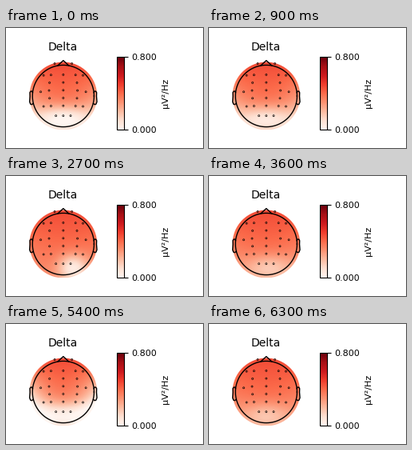
Animation of 247x150 px, one loop 7200 ms. Source, as a matplotlib script:

```python
import numpy as np
import matplotlib.pyplot as plt
from matplotlib.animation import FuncAnimation
from matplotlib.patches import Circle

W, H, DPI = 247, 150, 100
CX, CY, R = 71.8, 85, 38.6
CLIP = 1.1
VMAX = 0.8

plt.rcParams["font.family"] = "DejaVu Sans"

# Dip at the back of the head: depth, sideways shift, width; fade of the sides
STEPS = [
    (0.34, 0.00, 0.9, 0.08),
    (0.27, 0.00, 0.9, 0.08),
    (0.26, 0.00, 1.2, 0.18),
    (0.29, 0.33, 0.5, 0.02),
    (0.18, 0.10, 0.8, 0.03),
    (0.12, 0.15, 0.8, 0.02),
    (0.27, 0.05, 1.2, 0.18),
    (0.17, 0.00, 0.8, 0.03),
]

# Head coordinates: u to the right, v to the front, head radius 1
axis = np.linspace(-CLIP, CLIP, 64)
U, V = np.meshgrid(axis, axis)


def field(step):
    depth, shift, width, fade = STEPS[step]
    front = 0.40 + 0.06 * V
    sides = fade * (U ** 2 + 0.2) * (1.05 - V)
    dip = depth * np.exp(-((U - shift) / width) ** 2 - ((V + 0.8) / 0.45) ** 2)
    return front - sides - dip


def sensors():
    """Five midline rows with side pairs, plus the front and back rows."""
    spots = [(-10.8, 44.5), (10.8, 44.5)]
    spots += [(x, 109.7) for x in (-9.2, 0, 9.2)]
    for row in range(5):
        bend = (row - 2) ** 2
        y = 58.4 + 9.7 * row
        inner = 17.8 - 0.6 * bend
        spots += [(-inner, y + 0.3), (0, y), (inner, y + 0.3)]
        if row % 2 == 0:
            outer = 28.3 - 0.9 * bend
            drop = 2 - 0.3 * bend
            spots += [(-outer, y + drop), (outer, y + drop)]
    return np.array(spots) + (CX, 0)


fig = plt.figure(figsize=(W / DPI, H / DPI), dpi=DPI, facecolor="white")
ax = fig.add_axes([0, 0, 1, 1])
ax.axis("off")

reach = CLIP * R
image = ax.imshow(field(0), cmap="Reds", vmin=0, vmax=VMAX, origin="lower",
                  extent=(CX - reach, CX + reach, CY + reach, CY - reach),
                  interpolation="bilinear", aspect="auto")
ax.set_xlim(0, W)
ax.set_ylim(H, 0)
image.set_clip_path(Circle((CX, CY), reach, transform=ax.transData))


def outline(u, v):
    ax.plot(CX + R * np.asarray(u), CY - R * np.asarray(v),
            color="black", lw=1)


turn = np.linspace(0, 2 * np.pi, 101)
outline(np.cos(turn), np.sin(turn))
outline([-0.18, 0, 0.18], [0.984, 1.15, 0.984])
ear_u = np.array([0.994, 1.02, 1.036, 1.06, 1.084,
                  1.08, 1.094, 1.064, 1.02, 0.978])
ear_v = np.array([0.111, 0.155, 0.157, 0.149, 0.111,
                  -0.011, -0.186, -0.263, -0.277, -0.24])
for side in (-1, 1):
    outline(side * ear_u, ear_v)

ax.scatter(*sensors().T, s=0.25, facecolor="none", edgecolor="black",
           linewidth=1.5, zorder=3)

ax.text(71.3, 28, "Delta", fontsize=10, ha="center", va="baseline")

cax = fig.add_axes([139 / W, (H - 127) / H, 9 / W, 91 / H])
bar = fig.colorbar(image, cax=cax, ticks=[0, VMAX], format="%.3f")
bar.ax.tick_params(labelsize=8)
bar.set_label("µV²/Hz", fontsize=8)


def update(step):
    image.set_data(field(step))
    return [image]


anim = FuncAnimation(fig, update, frames=len(STEPS), interval=900,
                     repeat=True, repeat_delay=0, blit=False)
plt.show()
```
